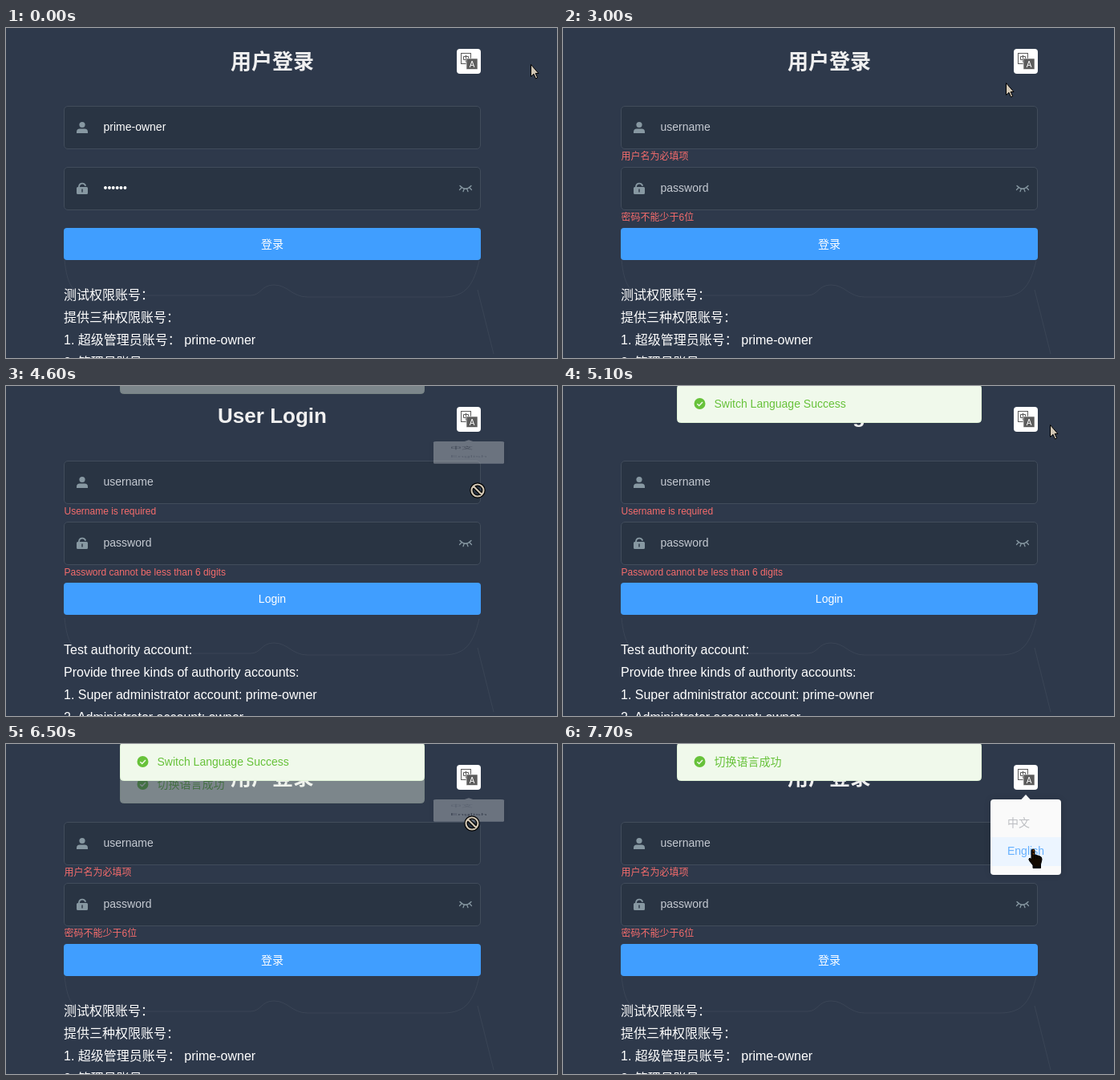
Animation, 687 px wide and 411 px high, one loop 8000 ms. Source, as an HTML page:

```html
<!DOCTYPE html>
<html lang="zh-CN">
<head>
<meta charset="utf-8">
<title>Login form</title>
<style>
html, body { margin: 0; width: 100%; height: 100%; overflow: hidden; background: #2e394b; }
svg { display: block; width: 100%; height: 100%; }
text { font: 14px "Liberation Sans", "Noto Sans CJK SC", "Noto Sans CJK", sans-serif; fill: #fff; }
.title { font-size: 26px; font-weight: bold; fill: #f0f0f0; text-anchor: middle; }
.mid { text-anchor: middle; }
.note { font-size: 16px; }
.err { font-size: 12px; fill: #f56c6c; }
.toast text { fill: #67c23a; }
.field { fill: #293443; stroke: #414c5b; }
.icon { fill: #8798a2; }
.line { fill: none; stroke: #8798a2; stroke-width: 1.3; stroke-linecap: round; }
.inv { fill: #fff; mix-blend-mode: difference; }
.edge { fill: none; stroke: #000; stroke-linejoin: round; }
.thick { fill: none; stroke: #000; stroke-width: 3; }
.thin { fill: none; stroke: #e6e0d6; stroke-width: 1; }
</style>
</head>
<body>
<svg viewBox="0 0 687 411">
  <defs>
    <filter id="soft" x="-20%" y="-20%" width="140%" height="140%"><feGaussianBlur stdDeviation="4"/></filter>
  </defs>
  <rect width="687" height="411" fill="#2e394b"/>
  <path d="M73 289C76 320 84 333 104 333H305C318 333 318 320 334 320C352 320 356 335 376 335H545C575 335 583 318 590 290M588 326L608 406" fill="none" stroke="#fff" stroke-opacity=".06"/>

  <text id="title" class="title" x="332"></text>
  <g id="form">
    <rect class="field" x="72.5" y="97.5" width="519" height="53" rx="4.5"/>
    <rect class="field" x="72.5" y="173.5" width="519" height="53" rx="4.5"/>
    <g class="icon">
      <circle cx="95" cy="120.5" r="3.6"/>
      <path d="M88 131V129.500Q88 125.500 92 125.500H98Q102 125.500 102 129.500V131Z"/>
      <path fill-rule="evenodd" d="M89.500 198H100.500Q102 198 102 199.500V205.500Q102 207 100.500 207H89.500Q88 207 88 205.500V199.500Q88 198 89.500 198ZM94.300 200.500V204.500H95.700V200.500Z"/>
    </g>
    <path class="line" style="stroke-width:1.800" d="M91 198V197.500A4.200 4.200 0 0 1 99 196"/>
    <path class="line" d="M566 196.500Q573 204 580 196.500M567.500 199.500L565.500 201.500M571 201L570 203.700M575 201L576 203.700M578.500 199.500L580.500 201.500"/>
    <rect id="selUser" y="115" height="17" fill="#3390ff"/>
    <rect id="selPass" y="191" height="17" fill="#3390ff"/>
    <text id="user" x="121.500" y="128"></text>
    <text id="pass" x="121.500" y="204"></text>
    <text id="errUser" class="err" x="72.500" y="164"></text>
    <text id="errPass" class="err" x="72.500" y="240"></text>
    <rect x="72" y="249" width="520" height="40" rx="4" fill="#409eff"/>
    <text id="login" class="mid" x="332" y="274"></text>
    <text id="note0" class="note" x="72" y="338"></text>
    <text id="note1" class="note" x="72" y="366"></text>
    <text id="note2" class="note" x="72" y="394"></text>
    <text id="note3" class="note" x="72" y="422"></text>
  </g>

  <rect x="562" y="26" width="30" height="31" rx="4" fill="#fff"/>
  <rect x="567.500" y="31.500" width="12" height="13" fill="#fff" stroke="#5c5c5c"/>
  <path d="M570.500 35.500H576.500V39.500H570.500ZM573.500 33.500V43" fill="none" stroke="#5c5c5c"/>
  <rect x="574" y="38" width="14" height="13.500" fill="#5c5c5c" stroke="#fff" stroke-width=".6"/>
  <text class="mid" x="581" y="48.500" style="font-size:10px">A</text>

  <g id="toast2" class="toast"></g>
  <g id="toast1" class="toast"></g>

  <g id="tip">
    <path d="M571 64.500L577 58L583 64.500Z" fill="#fff"/>
    <rect x="548.500" y="64.500" width="57" height="35" rx="4" fill="#fff" stroke="#e4e7ed"/>
    <text class="mid" x="577" y="86" style="font-size:12px;fill:#303133">国际化</text>
  </g>

  <g id="menu">
    <rect x="533" y="69" width="88" height="94" rx="4" fill="#000" opacity=".14" filter="url(#soft)"/>
    <path d="M571 69.500L577 63L583 69.500Z" fill="#fafafa"/>
    <rect x="533" y="69" width="88" height="94" rx="4" fill="#fafafa"/>
    <rect id="hover" x="533" width="88" height="36" fill="#ecf5ff"/>
    <text id="item0" x="554" y="103">中文</text>
    <text id="item1" x="554" y="138">English</text>
  </g>

  <g id="arrow">
    <path class="inv" d="M.5 .5V15.500L4 12.300L6.500 18L8.700 17L6.200 11.500H10Z"/>
    <path class="edge" d="M.5 .5V15.500L4 12.300L6.500 18L8.700 17L6.200 11.500H10Z"/>
  </g>
  <g id="hand">
    <path class="inv" d="M-2 1.500Q-2 0 0 0T2 1.500V7L8 8.500Q11.500 9.500 11 13L9.500 19V23.500H0V20L-4.500 14.500Q-6 11.500-4 11L-2 12.500Z"/>
    <path class="edge" d="M-2 1.500Q-2 0 0 0T2 1.500V7L8 8.500Q11.500 9.500 11 13L9.500 19V23.500H0V20L-4.500 14.500Q-6 11.500-4 11L-2 12.500ZM2 7V12M5 8V12M8 9V12"/>
  </g>
  <g id="beam">
    <path class="thick" d="M-4 -7.500H-1L0 -6.500L1 -7.500H4M0 -6.500V6.500M-4 7.500H-1L0 6.500L1 7.500H4"/>
    <path class="thin" d="M-3.500 -7.500H-1L0 -6.500L1 -7.500H3.500M0 -6.500V6.500M-3.500 7.500H-1L0 6.500L1 7.500H3.500"/>
  </g>
  <g id="deny">
    <path class="thick" style="stroke-width:4.500" d="M-7.500 0A7.500 7.500 0 1 1 7.500 0A7.500 7.500 0 1 1 -7.500 0M-5.300 -5.300L5.300 5.300"/>
    <path class="thin" style="stroke-width:2.200;stroke:#d1c6b4" d="M-7.500 0A7.500 7.500 0 1 1 7.500 0A7.500 7.500 0 1 1 -7.500 0M-5.300 -5.300L5.300 5.300"/>
  </g>
</svg>
<script>
const LOOP = 8000, STEP = 100;
const $ = id => document.getElementById(id);
const clamp = (v, a = 0, b = 1) => Math.min(b, Math.max(a, v));
const ramp = (t, start, ms) => clamp((t - start) / ms);
const easeOut = p => 1 - (1 - p) ** 3;

const words = {
  zh: {
    title: '用户登录', login: '登录',
    errUser: '用户名为必填项', errPass: '密码不能少于6位',
    note0: '测试权限账号：', note1: '提供三种权限账号：',
    note2: '1. 超级管理员账号： prime-owner', note3: '2. 管理员账号： owner'
  },
  en: {
    title: 'User Login', login: 'Login',
    errUser: 'Username is required', errPass: 'Password cannot be less than 6 digits',
    note0: 'Test authority account:', note1: 'Provide three kinds of authority accounts:',
    note2: '1. Super administrator account: prime-owner', note3: '2. Administrator account: owner'
  }
};

// Pointer path: time, x, y
const path = [
  [0, 654, 45], [200, 400, 100], [300, 240, 119], [400, 196, 124], [500, 112, 122],
  [600, 48, 100], [700, 84, 58], [1000, 84, 58], [1300, 120, 120], [1600, 196, 203],
  [1700, 204, 210], [1800, 204, 210], [1900, 128, 210], [2000, 128, 210], [2200, 10, 190],
  [2400, 30, 120], [2600, 150, 45], [2900, 529, 93], [3100, 575, 42], [3600, 575, 42],
  [4000, 589, 78], [4300, 588, 130], [4600, 588, 130], [4900, 636, 66], [5100, 607, 48],
  [5400, 577, 38], [5700, 577, 40], [6300, 581, 99], [6500, 581, 99], [6800, 580, 62],
  [7000, 568, 42], [7300, 572, 44], [7600, 585, 124], [7700, 586, 131], [LOOP, 586, 131]
];
const menuSpans = [[3400, 4500], [5400, 6400], [7300, 9000]];
const tipSpans = [[3100, 4400], [6900, 7400]];

const makeToast = (id, label) => {
  $(id).innerHTML = `<rect x="142.5" y="0.5" width="379" height="47" rx="4" fill="#f0f9eb" stroke="#e1f3d8"/>
    <circle cx="170.500" cy="24" r="7" fill="#67c23a"/>
    <path d="M167.300 24.200L169.700 26.500L174 22" fill="none" stroke="#f0f9eb" stroke-width="1.500"/>
    <text x="188.500" y="29">${label}</text>`;
};
makeToast('toast1', 'Switch Language Success');
makeToast('toast2', '切换语言成功');

const setText = (id, s) => { if ($(id).textContent !== s) $(id).textContent = s; };
const fade = (id, a) => {
  $(id).style.display = a > 0 ? '' : 'none';
  $(id).setAttribute('opacity', a);
};
const move = (id, x, y) => $(id).setAttribute('transform', `translate(${x} ${y})`);

function pointer(t) {
  const i = path.findIndex(p => p[0] > t);
  const [t0, x0, y0] = path[i - 1], [t1, x1, y1] = path[i];
  const k = (t - t0) / (t1 - t0);
  return [x0 + (x1 - x0) * k, y0 + (y1 - y0) * k];
}

function menuAmount(t) {
  const span = menuSpans.find(([a, b]) => t >= a && t < b + 300);
  if (!span) return 0;
  return t < span[1] ? easeOut(ramp(t, span[0], 300)) : 1 - easeOut(ramp(t, span[1], 300));
}

function select(id, on, left, right) {
  $(id).setAttribute('x', left);
  $(id).setAttribute('width', on ? right - left : 0);
}

function drawField(id, value, hint) {
  setText(id, value || hint);
  $(id).style.fill = value ? '#fff' : '#c5cad2';
}

function draw(t) {
  const en = t >= 4600 && t < 6500;
  const lang = words[en ? 'en' : 'zh'];
  for (const id in lang) setText(id, lang[id]);
  $('title').setAttribute('y', en ? 46 : 50.5);
  const shift = en ? -4 : 0;
  move('form', 0, shift);

  const [x, y] = pointer(t);
  drawField('user', t < 1000 ? 'prime-owner' : '', 'username');
  drawField('pass', t < 2300 ? '••••••' : '', 'password');
  select('selUser', t >= 400 && t < 1000, clamp(x, 121.5, 199), 199);
  select('selPass', t >= 1900 && t < 2300, 121.5, 151.5);
  fade('errUser', ramp(t, 900, 300));
  fade('errPass', ramp(t, 2200, 300));

  const out = ramp(t, 7300, 300);
  move('toast1', 0, -2 - 48 * (1 - ramp(t, 4500, 400)) - 48 * out);
  fade('toast1', ramp(t, 4500, 250) * (1 - out));
  move('toast2', 0, 62 - 48 * (1 - ramp(t, 6400, 400)) - 64 * ramp(t, 7300, 400));
  fade('toast2', ramp(t, 6400, 250));

  const tip = tipSpans.find(([a, b]) => t >= a && t < b);
  fade('tip', tip ? ramp(t, tip[0], 250) : 0);

  const open = menuAmount(t);
  fade('menu', open);
  $('menu').setAttribute('transform', `translate(0 69) scale(1 ${open}) translate(0 -69)`);

  const inMenu = open > .2 && x > 533 && x < 621 && y >= 69 && y < 163;
  const item = inMenu && y >= 80 && y < 152 ? Math.floor((y - 80) / 36) : -1;
  const off = en ? 1 : 0;
  const hot = item >= 0 && item !== off;
  $('hover').style.display = hot ? '' : 'none';
  $('hover').setAttribute('y', 80 + 36 * Math.max(item, 0));
  [0, 1].forEach(i => {
    $('item' + i).style.fill = i === off ? '#bcbec2' : hot && i === item ? '#66b1ff' : '#606266';
  });

  const fy = y - shift;
  const inField = x > 72 && x < 592 && (fy > 97 && fy < 151 || fy > 173 && fy < 227);
  const onIcon = x > 562 && x < 592 && y > 26 && y < 57;
  const kind = hot || onIcon ? 'hand' : item >= 0 ? 'deny' : inField && !inMenu ? 'beam' : 'arrow';
  for (const id of ['arrow', 'hand', 'beam', 'deny']) $(id).style.display = id === kind ? '' : 'none';
  move(kind, Math.round(x), Math.round(y));
}

const start = performance.now();
function tick() {
  const t = (performance.now() - start) % LOOP;
  draw(Math.floor(t / STEP) * STEP);
  requestAnimationFrame(tick);
}
tick();
</script>
</body>
</html>
```
